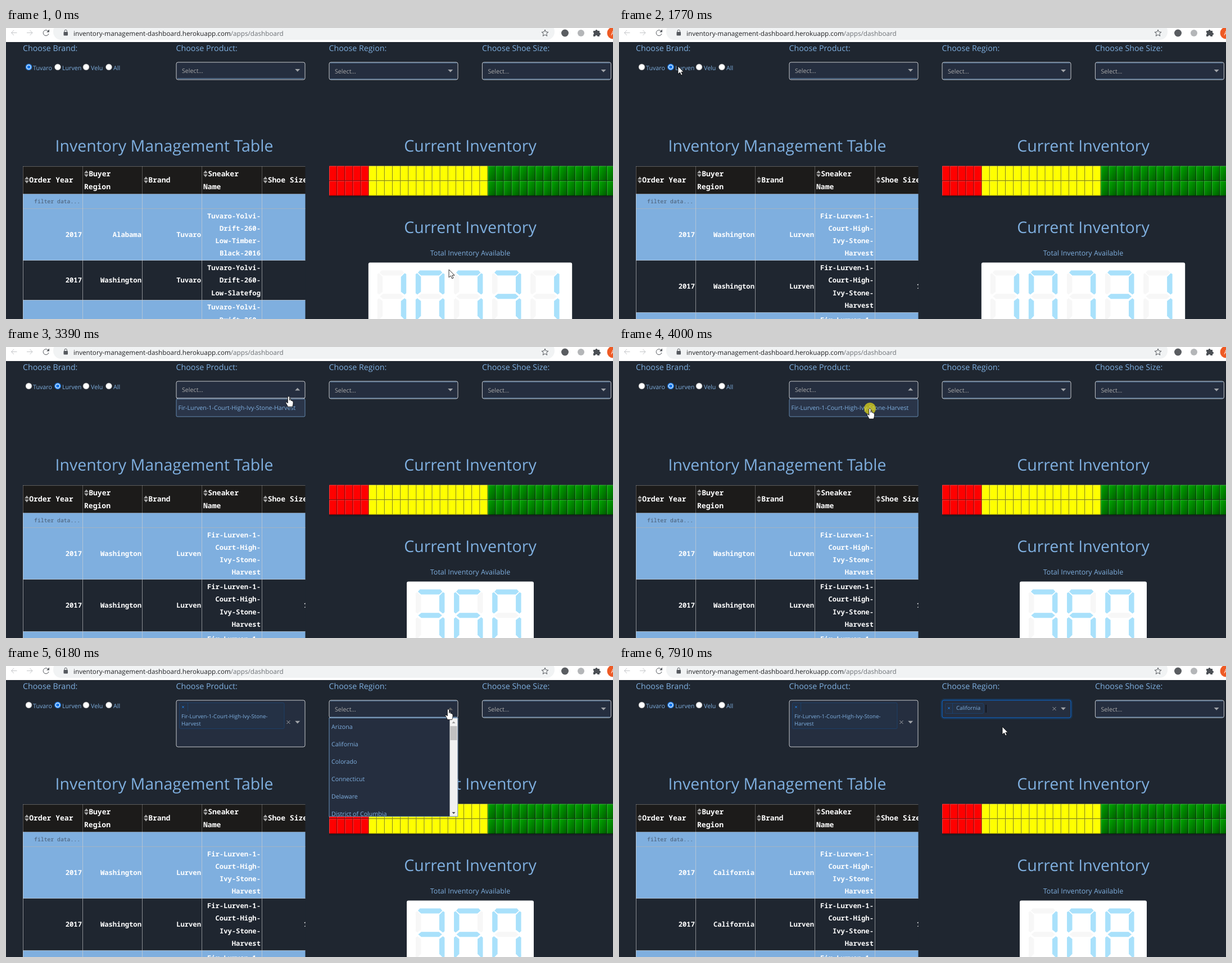
An HTML page for the animation above (7990 ms loop, 1080x518 px).

```html
<!DOCTYPE html>
<html lang="en">
<head>
<meta charset="utf-8">
<title>Inventory dashboard</title>
<style>
  html, body { margin: 0; width: 100%; height: 100%; overflow: hidden; background: #1f2630; }
  svg { display: block; width: 100%; height: 100%; }
  text { font-family: "Open Sans", "Noto Sans", sans-serif; white-space: pre; text-rendering: geometricPrecision; }
  .mono { font-family: "Noto Sans Mono", "DejaVu Sans Mono", monospace; }
  .line { fill: none; stroke-width: 1; }
  .crisp { shape-rendering: crispEdges; }
</style>
</head>
<body>
<svg id="stage" viewBox="0 0 1080 518">
  <defs>
    <linearGradient id="green" x2="1" y2="1">
      <stop offset="0" stop-color="#00a800"/><stop offset="1" stop-color="#005a00"/>
    </linearGradient>
    <clipPath id="tableClip"><rect x="29" y="245" width="503.5" height="273"/></clipPath>
    <clipPath id="menuClip"><rect x="575" y="93" width="229" height="174.5"/></clipPath>
  </defs>
</svg>
<script>
const LOOP = 7990, STEP = 77.3;
const BLUE = '#7fafdf', NAVY = '#252e3f', DARK = '#1f2630', BORDER = '#c8cacd';
const stage = document.getElementById('stage');
const PRODUCT = ['Fir-Lurven-1-', 'Court-High-', 'Ivy-Stone-', 'Harvest'];

// Markup helpers; text is placed by the middle of its capitals.
const text = (x, y, str, size, fill = BLUE, more = '') =>
  `<text x="${x}" y="${y + size * .36}" font-size="${size}" fill="${fill}" ${more}>${str}</text>`;
const rect = (x, y, w, h, fill, more = '') =>
  `<rect x="${x}" y="${y}" width="${w}" height="${h}" fill="${fill}" ${more}/>`;
const path = (d, more) => `<path d="${d}" ${more}/>`;
const line = (d, stroke, more = '') => path(d, `class="line" stroke="${stroke}" ${more}`);
const group = (id, body, more = '') => `<g id="${id}" ${more}>${body}</g>`;
const range = n => [...Array(n).keys()];
const middle = 'text-anchor="middle"';

function browserBar() {
  const icon = 'stroke-width="1.5" stroke-linejoin="round"';
  return rect(0, 0, 1080, 25, '#fff') + rect(84, -8, 892, 29, '#f1f3f4', 'rx="14"') +
    line('M19.5 8.5H9.5M14 4 9.5 8.5 14 13', '#c4c6c9', icon) +
    line('M37 8.5H47M42.5 4 47 8.5 42.5 13', '#c4c6c9', icon) +
    line('M75 5.5A5 5 0 1 0 76 10', '#55595e', icon) +
    path('M77 2.5V7.5H72Z', 'fill="#55595e"') +
    rect(102.5, 7, 7.5, 6.5, '#55595e', 'rx="1"') +
    line('M104 7.5V5.5a2.2 2.2 0 0 1 4.4 0V7.5', '#55595e', 'stroke-width="1.3"') +
    text(120, 9.5, 'inventory-management-dashboard.herokuapp.com<tspan fill="#6b6f74">/apps/dashboard</tspan>', 11.7, '#202124') +
    line('M959 3l1.7 4 4.3.3-3.3 2.8 1 4.2-3.7-2.3-3.7 2.3 1-4.2-3.3-2.8 4.3-.3z', '#55595e', 'stroke-width="1.2"') +
    '<circle cx="994.5" cy="9" r="6.5" fill="#5a5d61"/><circle cx="1023" cy="9" r="6" fill="#b4b6b8"/>' +
    path('M1045 5h3.5a2 2 0 1 1 4 0h3.5v3.5a2 2 0 1 1 0 4V15h-3.7a2 2 0 0 0-4 0H1045v-3.5a2 2 0 0 0 0-3.5z', 'fill="#4b4f54"') +
    '<circle cx="1080" cy="9" r="10.5" fill="#ee5a24"/>' + text(1080, 9, 'A', 11, '#fff', middle);
}

const radioX = [40.5, 92, 142.5, 183];
function filters() {
  const labels = ['Choose Brand:', 'Choose Product:', 'Choose Region:', 'Choose Shoe Size:'];
  const brands = ['Tuvaro', 'Lurven', 'Velu', 'All'];
  return labels.map((s, i) => text([30, 302.5, 574.5, 847][i], 35.5, s, 14.25)).join('') +
    brands.map((s, i) =>
      `<circle cx="${radioX[i]}" cy="69.5" r="5.5" fill="#fff" stroke="#777" stroke-width=".6"/>` +
      text([48, 100, 151, 191][i], 71, s, 10.7)).join('') +
    group('radio', '<circle r="5" fill="#fff" stroke="#0a73e8" stroke-width="1.5"/><circle r="3" fill="#0a73e8"/>');
}

const caret = (id, x, y) =>
  `<g transform="translate(${x} ${y})">${path('M-4.5-2.2H4.5L0 2.5Z', `id="${id}" fill="#a0a3a8"`)}</g>`;
const cross = (x, y, r, color) =>
  line(`M${x - r} ${y - r}l${2 * r} ${2 * r}m0 ${-2 * r}l${-2 * r} ${2 * r}`, color, 'stroke-width="1.1"');
const frame = (x, y, w, h, stroke, fill = NAVY) =>
  rect(x, y, w, h, fill, `rx="3" stroke="${stroke}"`);
const glow = (x, h) =>
  rect(x - 1.5, 59.5, 232, h + 3, 'none', 'rx="5" stroke="#007eff" stroke-opacity=".15" stroke-width="3"') +
  frame(x, 61, 229, h, '#0b68d0');

function emptySelect(x, y, id) {
  const rim = y === 76 ? `M${x + 2} 90h225` : `M${x + 2} 91h225M${x + 2} 62h225`;
  return frame(x, 61, 229, 31, BORDER) +
    line(rim, BLUE, `id="${id}Rim" stroke-opacity=".75"`) +
    text(x + 10, y, 'Select...', 10.7, '#aaa') + caret(id, x + 215.7, y - .7);
}

function tag(x, y, w, h, split) {
  const edge = 'stroke="#007eff" stroke-opacity=".2"';
  return rect(x, y, w, h, '#007eff', `fill-opacity=".03" rx="2" ${edge}`) + line(split, '#007eff', 'stroke-opacity=".2"');
}

function productSelect() {
  const full = PRODUCT.join('');
  return group('productEmpty', emptySelect(303, 76, 'productCaret')) +
    group('productMenu', line('M304 90.5h227', '#7d8696') +
      rect(303, 92.5, 229, 31.5, '#2a3549', `rx="2" stroke="${BLUE}" stroke-opacity=".7"`) +
      text(306.5, 108.5, full, 10.7)) +
    group('productChosen',
      frame(303, 61, 229, 83, BORDER) + group('productFocus', glow(303, 83)) +
      tag(308.5, 65.5, 186.5, 46, 'M323.5 65.5V80.5') + cross(315, 73, 1.8, '#1f7be0') +
      text(312, 89.5, PRODUCT.slice(0, 3).join(''), 9.65) + text(312, 102.5, PRODUCT[3], 9.65) +
      cross(502.5, 100, 3, '#a0a3a8') + caret('productChosenCaret', 518.7, 100) +
      group('productInput', rect(307.3, 119, 1, 14, '#000')));
}

function regionSelect() {
  const states = ['Arizona', 'California', 'Colorado', 'Connecticut', 'Delaware', 'District of Columbia'];
  return group('regionEmpty', emptySelect(575, 77, 'regionCaret')) +
    group('regionMenu',
      rect(575, 92.5, 229, 175.5, NAVY, `stroke="${BLUE}" stroke-opacity=".8"`) +
      `<g clip-path="url(#menuClip)">${states.map((s, i) => text(579, 108.5 + 31 * i, s, 10.7)).join('')}</g>` +
      rect(789.5, 93, 14, 174.5, '#f1f1f1') + rect(790.5, 107, 12, 25, '#c1c1c1') +
      path('M793.5 102h6l-3-3.5z', 'fill="#9a9a9a"') + path('M793.5 260h6l-3 3.5z', 'fill="#505050"')) +
    group('regionChosen', glow(575, 31) + tag(580.5, 66.5, 68, 18, 'M593.5 66.5v18') +
      cross(587, 75, 1.8, '#1f7be0') + text(600, 75, 'California', 9.65) +
      cross(774.5, 76, 3, '#a0a3a8') + caret('regionChosenCaret', 790.5, 76) +
      group('regionInput', rect(652.5, 69, 1, 14, '#000')));
}

const columns = [30.5, 136.5, 242.5, 348.5, 455];
const rule = (d, opacity) => path(d, `class="line crisp" stroke="#d3d3d3" stroke-opacity="${opacity}"`);

function tableBody(id, region, brand, names) {
  let top = 321.5, out = '';
  names.forEach((lines, row) => {
    const h = lines.length * 22.2 + 3.6, mid = top + h / 2;
    const cell = (x, y, s) => text(x, y, s, 12.2, '#fff', 'class="mono" font-weight="600" text-anchor="end"');
    out += rect(30, top, 503, h, row % 2 ? DARK : BLUE);
    ['2017', region[row], brand].forEach((s, i) => out += cell([135, 241, 347][i], mid, s));
    lines.forEach((s, i) => out += cell(453, top + 13 + 22.2 * i, s));
    if (row === 1 && lines.length === 4) out += text(529.7, mid, '1', 12.2, '#fff', 'class="mono" font-weight="600"');
    out += rule(`M30 ${top}H533`, .55);
    top += h;
  });
  return group(id, out);
}

function table() {
  const heads = [['Order Year'], ['Buyer', 'Region'], ['Brand'], ['Sneaker', 'Name'], ['Shoe Size']];
  const head = heads.map((lines, i) => {
    const x = columns[i], y = lines[1] ? 259.5 : 270.5, more = 'class="mono" font-weight="700"';
    return path(`M${x + 2.5} ${y - 1}h8l-4-5zm0 2h8l-4 5z`, 'fill="#a9a9a9"') +
      text(x + 10.7, y, lines[0], 13.05, '#fff', more) +
      (lines[1] ? text(x + 2.5, 282, lines[1], 13.05, '#fff', more) : '');
  }).join('');
  const first = ['Tuvaro-Yolvi-', 'Drift-260-'];
  const early = [[...first, 'Low-Timber-', 'Black-2016'], [...first, 'Low-Slatefog'], [...first, 'Low-Timber-', 'Black-2016']];
  const later = [PRODUCT, PRODUCT, PRODUCT];
  const all = s => [s, s, s];
  return `<g clip-path="url(#tableClip)">` +
    rect(30, 246, 503, 49.5, '#1c1b1a') + head + rect(30, 295.5, 503, 26, BLUE) +
    text(132, 308.5, 'filter data...', 9.75, '#46586e', 'class="mono" text-anchor="end"') +
    tableBody('tableA', ['Alabama', 'Washington', ''], 'Tuvaro', early) +
    tableBody('tableB', all('Washington'), 'Lurven', later) +
    tableBody('tableC', all('California'), 'Lurven', later) +
    rule('M30 246H533M30 295.5H533', .35) +
    rule(columns.map(x => `M${x} 246V295`).join(''), .3) +
    rule(columns.map(x => `M${x} 295V518`).join(''), .6) + '</g>';
}

function gauge() {
  const w = 14.12, color = i => i < 5 ? '#ff0000' : i < 20 ? '#ffff00' : 'url(#green)';
  return rect(575, 298.5, 505, 3, '#000', 'opacity=".2"') +
    range(72).map(n => {
      const i = n % 36, x = 575 + i * w, y = n < 36 ? 245.6 : 272.2;
      return rect(x, y, w, 26.4, color(i)) +
        line(`M${x + .5} ${y + 26}V${y + .5}H${x + w}`, '#fff', 'stroke-opacity=".22"') +
        line(`M${x + w - .5} ${y}V${y + 26}H${x}`, '#000', 'stroke-opacity=".5"');
    }).join('');
}

// Segment order: top, upper right, lower right, lower left, upper left, middle.
const segments = {0: '111110', 1: '011000', 3: '111001', 6: '101111', 7: '111000', 8: '111111'};
const upright = 'M51.5 6.5V40.5L48.5 43 42 38V11.5L48.5 5Z';
const flips = ['', '', 'translate(0 92.6) scale(1 -1)', 'translate(51.5 92.6) scale(-1 -1)', 'translate(51.5 0) scale(-1 1)', ''];
function digit(d, x) {
  return `<g transform="translate(${x} 431.5)">` + [...segments[d]].map((on, i) => {
    const shape = i === 0 ? 'M7.5 0H44L47.5 4 42 9H9.5L4 4Z' :
      i === 5 ? 'M10 41.8H41.5L47 46.3 41.5 50.8H10L4.5 46.3Z' : upright;
    return path(shape, `fill="${+on ? '#a9e1fb' : '#f7f7f7'}" transform="${flips[i]}"`);
  }).join('') + '</g>';
}
function display(id, digits) {
  const n = digits.length, left = 826 - 34.1 * n;
  return group(id, rect(left - 10.7, 417.5, 68.2 * n + 21.4, 120, '#fff', 'rx="3"') +
    [...digits].map((d, i) => digit(d, left + 5.2 + 68.1 * i)).join(''));
}

stage.insertAdjacentHTML('beforeend',
  rect(0, 0, 1080, 518, DARK) + browserBar() + filters() +
  text(281.5, 210, 'Inventory Management Table', 28.5, BLUE, middle) +
  text(826, 210, 'Current Inventory', 28.5, BLUE, middle) +
  text(826, 355, 'Current Inventory', 28.5, BLUE, middle) +
  text(826, 400.5, 'Total Inventory Available', 12.5, BLUE, middle) +
  table() + gauge() +
  display('ledA', '10731') + display('ledB', '360') + display('ledC', '108') +
  emptySelect(847.4, 77, 'sizeCaret') + productSelect() + regionSelect() +
  group('cursor',
    '<circle id="click" r="10.5" fill="#f0e414" fill-opacity=".68"/>' +
    path('M0 0V14L3.4 11 5.6 16 8 15 5.8 10.2H10Z', 'id="arrow" fill="#fff" stroke="#000" stroke-width=".8"') +
    path('M-1.7 1Q0-1.5 1.6 1V7Q3-.1 4.2 7.5 5.8 6.8 6.4 8.3 8 8 8 9.8V13Q7.8 15.5 6.5 18.5H-1.5Q-3 14.5-5.3 11.4-4.8 9.2-3 10.5L-1.7 12Z',
      'id="hand" fill="#fff" stroke="#000" stroke-width=".8"')));

// Pointer route: step, x, y.
const route = [
  [0, 788, 430], [1, 765, 408], [3, 610, 290], [6, 290, 105], [9, 115, 52], [11, 86, 74], [14, 87.5, 69.5],
  [22, 87.5, 69.5], [23, 105, 68], [26, 320, 62], [29, 533, 94], [31, 533, 94], [32, 530, 84], [34, 518, 78],
  [43, 518, 78], [44, 503, 88], [47, 446.5, 117], [48, 446.5, 117], [52, 446.5, 109.5], [53, 446.5, 109.5],
  [54, 452, 110], [56, 590, 124], [59, 733, 113], [61, 733, 113], [66, 804, 80], [68, 796, 76],
  [79, 796, 76], [80, 787, 77], [82, 735, 150], [84, 650, 235], [86, 592, 180], [88, 587.5, 137],
  [101, 587.5, 137], [102, 682, 108]
];
function pointerAt(step) {
  const k = route.findIndex(p => p[0] > step);
  if (k < 0) return route.at(-1).slice(1);
  const [a, b] = [route[k - 1], route[k]], f = (step - a[0]) / (b[0] - a[0]);
  return [1, 2].map(i => a[i] + (b[i] - a[i]) * f);
}

const el = id => document.getElementById(id);
const show = (id, on) => { el(id).style.display = on ? '' : 'none'; };
const place = (id, x, y) => el(id).setAttribute('transform', `translate(${x} ${y})`);

function render(t) {
  const during = (...spans) => spans.some(([a, b = LOOP]) => t >= a && t < b);
  const step = Math.floor((t + 25) / STEP);

  place('radio', radioX[t < 1390 ? 0 : 1], 69.5);
  show('tableA', t < 1620);
  show('tableB', during([1620, 7510]));
  show('tableC', t >= 7510);
  show('ledA', t < 1850);
  show('ledB', during([1850, 7280]));
  show('ledC', t >= 7280);

  const productOpen = during([2850, 4170]), regionOpen = during([5630, 7120]);
  show('productEmpty', t < 4170);
  show('productCaretRim', !productOpen);
  show('productMenu', productOpen);
  show('productChosen', t >= 4170);
  show('productFocus', t < 5630);
  show('productInput', during([4170, 4400], [4900, 5400]));
  show('regionEmpty', t < 7120);
  show('regionMenu', regionOpen);
  show('regionChosen', t >= 7120);
  show('regionInput', during([7120, 7240], [7740]));

  const setCaret = (id, open, hover) => {
    el(id).setAttribute('transform', open ? 'scale(1 -1)' : '');
    el(id).setAttribute('fill', hover ? '#666' : '#a0a3a8');
  };
  setCaret('productCaret', productOpen, during([2460, 3390]));
  setCaret('regionCaret', regionOpen, during([5200, 6260]));

  const hand = (step >= 32 && step < 54) || (step >= 66 && step < 92);
  place('cursor', ...pointerAt(step));
  show('hand', hand);
  show('arrow', !hand);
  show('click', during([1240, 1390], [2690, 2930], [3850, 4170], [5550, 5700], [6970, 7120]));
}

const start = performance.now();
(function tick() {
  render((performance.now() - start) % LOOP);
  requestAnimationFrame(tick);
})();
</script>
</body>
</html>
```
